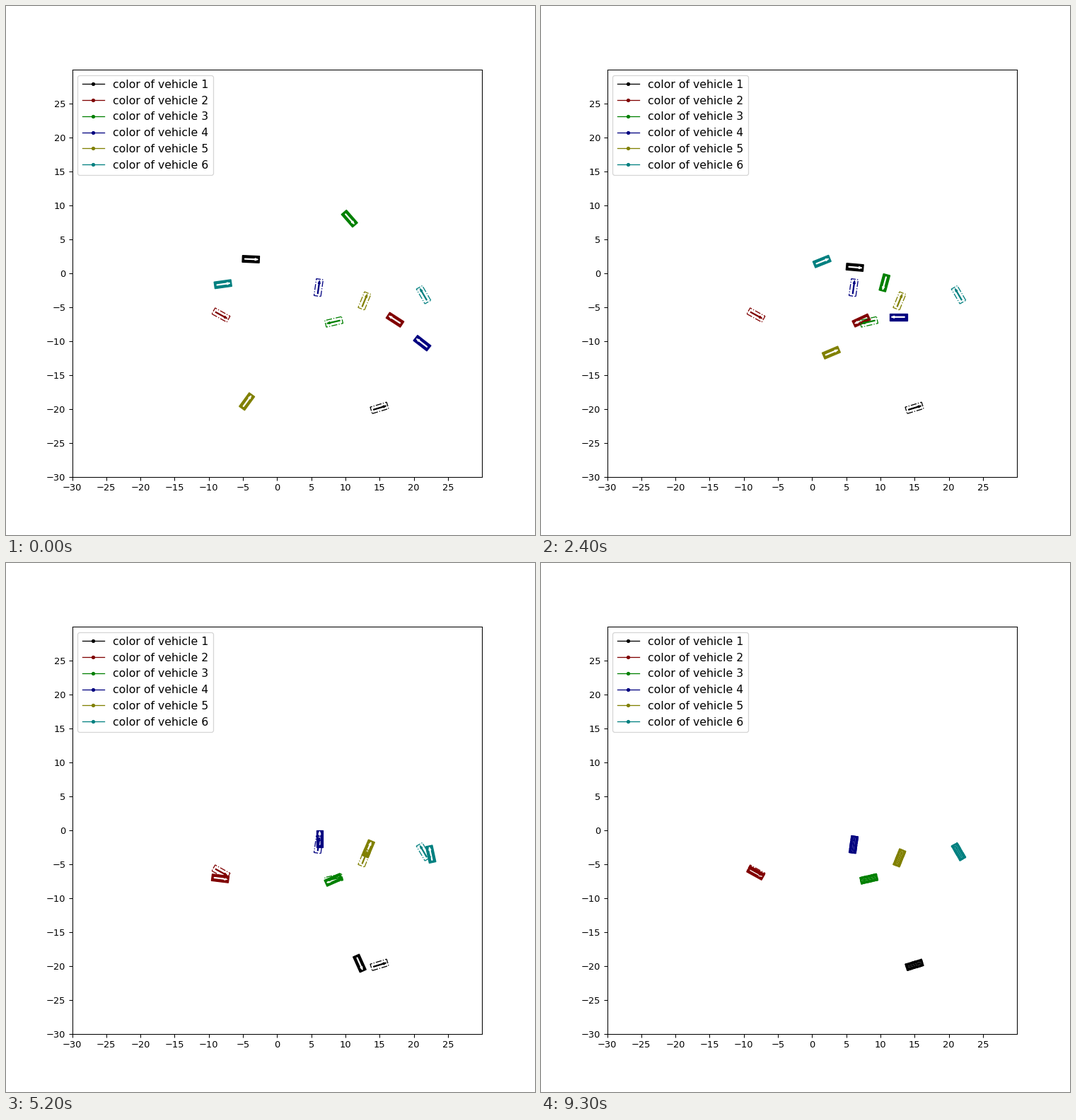
Animation, 748 px wide and 748 px high, one loop 9500 ms. Source, as a matplotlib script:

```python
import numpy as np
import matplotlib.pyplot as plt
from matplotlib.animation import FuncAnimation
from matplotlib.patches import FancyArrow, Rectangle
from matplotlib.transforms import Affine2D

FRAMES, STEP_MS = 95, 100
LENGTH, WIDTH = 2.5, 1.0
COLORS = ["black", "maroon", "green", "navy", "olive", "teal"]
KEY_STEPS = [1, 16, 24, 36, 52, 67]
PARKED = 83

# Each pose is x, y, heading in degrees
GOALS = [
    (14.97, -19.85, 17), (-8.22, -6.17, 331), (8.31, -7.18, -167),
    (6.07, -2.13, 442), (12.79, -4.09, 68), (21.44, -3.18, 120),
]

# Poses at the key steps; a vehicle with fewer poses reaches its goal next
POSES = [
    [(-3.84, 2.06, -2.5), (.61, .95, -4), (6.25, .86, -5),
     (14.34, -5.79, -33), (12.07, -19.61, -66), (16.62, -19.2, 19)],
    [(17.25, -6.87, 147), (12.76, -6.34, 179), (7.2, -6.97, 205),
     (-4.55, -6.43, 148), (-8.32, -7.11, 353), (-8.35, -6.38, 316)],
    [(10.59, 8.03, -49), (10.93, 3.6, -91), (10.6, -1.42, -105),
     (8.18, -6.31, -90), (8.24, -7.32, -156)],
    [(21.23, -10.31, 142), (17.24, -8.36, 152), (12.64, -6.46, 180),
     (3.41, -8.48, 314), (6.22, -1.23, 450)],
    [(-4.42, -18.91, 54), (-1.41, -15.5, 44), (2.8, -11.71, 23),
     (12.35, -10.03, 89), (13.34, -2.74, 67)],
    [(-7.93, -1.62, 8), (-3.42, -1.1, 21), (1.44, 1.72, 22),
     (13.15, .63, -21), (22.49, -3.54, 102), (21, -1.66, 115)],
]

# Tight turns and reversals between the key steps
TURNS = {
    "black": {41: (15.05, -12.5, -98), 61: (15.4, -20.35, 20)},
    "maroon": {46: (-9.8, -5.6, 255), 72: (-8.8, -6, 322)},
    "green": {44: (7.6, -8.2, -138)},
    "navy": {32: (4.2, -6.3, 200), 41: (6, -8.3, 415)},
    "teal": {46: (21.3, -3.2, 0), 63: (20.75, -.88, 116)},
}


def travel(color, poses, goal, steps):
    """Cubic motion whose velocity at each waypoint lies along the heading."""
    keys = dict(zip(KEY_STEPS, poses))
    keys.update(TURNS.get(color, {}))
    arrival = PARKED if len(poses) == len(KEY_STEPS) else KEY_STEPS[-1]
    rest = np.array(goal, float)
    if color == "maroon":
        rest -= (.03, .14, 0)
    keys[arrival] = rest

    t = np.array(sorted(keys), float)
    pose = np.array([keys[s] for s in sorted(keys)], float)
    slope = np.gradient(pose, t, axis=0)
    angle = np.radians(pose[:, 2])
    ahead = np.column_stack([np.cos(angle), np.sin(angle)])
    speed = (slope[:, :2] * ahead).sum(axis=1)
    slope[:, :2] = speed[:, None] * ahead
    slope[[0, -1]] = 0

    s = np.clip(steps, t[0], t[-1])
    i = np.clip(np.searchsorted(t, s, side="right") - 1, 0, len(t) - 2)
    h = (t[i + 1] - t[i])[:, None]
    u = (s - t[i])[:, None] / h
    return ((1 + 2 * u) * (1 - u) ** 2 * pose[i]
            + u * (1 - u) ** 2 * h * slope[i]
            + u * u * (3 - 2 * u) * pose[i + 1]
            + u * u * (u - 1) * h * slope[i + 1])


def place(parts, x, y, heading):
    move = Affine2D().rotate_deg(heading).translate(x, y) + ax.transData
    for part in parts:
        part.set_transform(move)


def make_parts(arrow_color, **box_style):
    box = Rectangle((-LENGTH / 2, -WIDTH / 2), LENGTH, WIDTH, **box_style)
    arrow = FancyArrow(-0.9, 0, 1.5, 0, width=0.1, color=arrow_color)
    for part in (box, arrow):
        ax.add_artist(part)
    return box, arrow


fig, ax = plt.subplots(figsize=(8, 8), dpi=93.5)
ax.set(xlim=(-30, 30), ylim=(-30, 30),
       xticks=np.arange(-30, 30, 5), yticks=np.arange(-30, 30, 5))

for n, color in enumerate(COLORS, 1):
    ax.plot([], [], ".-", color=color, lw=1, label=f"color of vehicle {n}")
ax.legend(loc="upper left", fontsize=12)

cars = [make_parts("white", fc=c, ec=c) for c in COLORS]
for goal, color in zip(GOALS, COLORS):
    place(make_parts(color, fill=False, ec=color, ls="dashdot"), *goal)

tracks = [travel(*car, np.arange(FRAMES)) for car in zip(COLORS, POSES, GOALS)]


def update(k):
    for parts, track in zip(cars, tracks):
        place(parts, *track[k])
    return [part for parts in cars for part in parts]


anim = FuncAnimation(fig, update, frames=FRAMES, interval=STEP_MS,
                     repeat=True, repeat_delay=0, blit=False)
plt.show()
```
